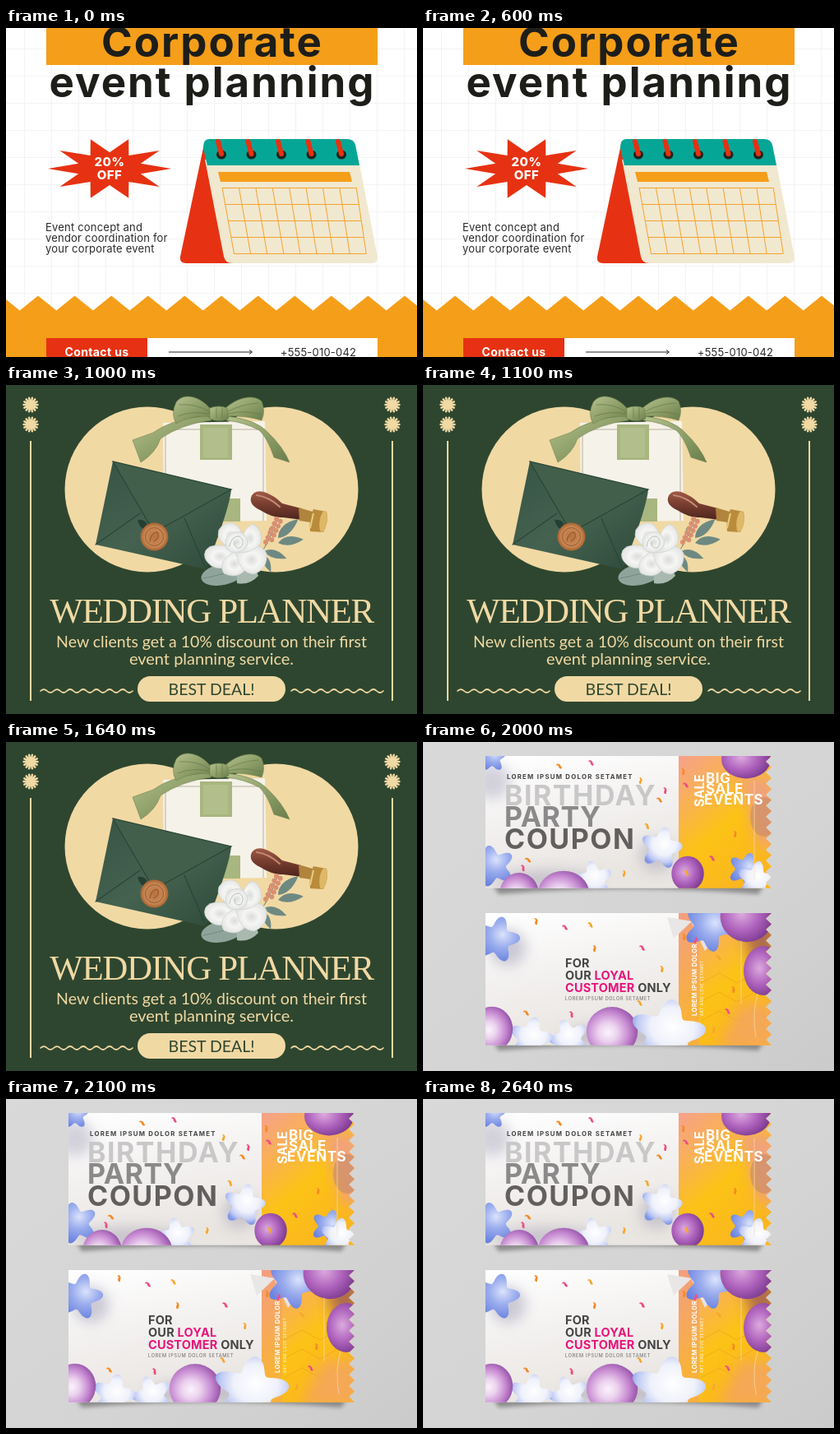
Animation, 500 px wide and 400 px high, one loop 3 s. Source, as an HTML page:

```html
<!DOCTYPE html>
<html lang="en">
<head>
<meta charset="utf-8">
<title>Event offers</title>
<style>
html, body { margin: 0; height: 100%; overflow: hidden; }
svg { display: block; width: 500px; height: 400px; font-family: Inter, sans-serif; }
.b { font-weight: 700; }
.mid { text-anchor: middle; }
.line { fill: none; stroke-linecap: round; }
</style>
</head>
<body>
<svg viewBox="0 0 500 400">
<defs>
  <pattern id="paper" x="22" y="25" width="33" height="33" patternUnits="userSpaceOnUse">
    <path d="M.5 0V33M0 .5H33" stroke="#f3f3f3" fill="none"/>
  </pattern>
  <linearGradient id="env" x2="1" y2="1"><stop stop-color="#365444"/><stop offset=".5" stop-color="#456250"/><stop offset="1" stop-color="#2c4939"/></linearGradient>
  <linearGradient id="silk" x2="1" y2="1"><stop stop-color="#b5c18f"/><stop offset=".5" stop-color="#8fa06a"/><stop offset="1" stop-color="#697d4b"/></linearGradient>
  <linearGradient id="wood" x2="0" y2="1"><stop stop-color="#a05c47"/><stop offset=".4" stop-color="#7c4032"/><stop offset="1" stop-color="#4d241d"/></linearGradient>
  <radialGradient id="petal"><stop stop-color="#d9dcd9"/><stop offset=".5" stop-color="#f6f6f4"/><stop offset="1" stop-color="#e4e6e5"/></radialGradient>
  <radialGradient id="seal"><stop stop-color="#b8713f"/><stop offset=".7" stop-color="#c98a57"/><stop offset="1" stop-color="#a7632f"/></radialGradient>
  <linearGradient id="wall" x2="1" y2="1"><stop stop-color="#d9d9d9"/><stop offset=".6" stop-color="#d4d4d4"/><stop offset="1" stop-color="#cbcbcb"/></linearGradient>
  <linearGradient id="sheet" x2=".25" y2="1"><stop stop-color="#fff"/><stop offset=".5" stop-color="#f3f1f0"/><stop offset="1" stop-color="#e9e5e1"/></linearGradient>
  <linearGradient id="gold" x2=".6" y2="1"><stop stop-color="#f6a08c"/><stop offset=".3" stop-color="#f9b155"/><stop offset=".6" stop-color="#fcc316"/><stop offset="1" stop-color="#fbb61f"/></linearGradient>
  <radialGradient id="ball" cx=".42" cy=".52" r=".62"><stop stop-color="#fbf3fb"/><stop offset=".3" stop-color="#ecd2ef"/><stop offset=".65" stop-color="#c78bd2"/><stop offset="1" stop-color="#8c479f"/></radialGradient>
  <radialGradient id="plum" cx=".4" cy=".45" r=".65"><stop stop-color="#dcaade"/><stop offset=".5" stop-color="#b064be"/><stop offset="1" stop-color="#743489"/></radialGradient>
  <radialGradient id="puff" cx=".55" cy=".42" r=".6"><stop stop-color="#fff"/><stop offset=".5" stop-color="#eff1fb"/><stop offset=".8" stop-color="#bfcaf3"/><stop offset="1" stop-color="#7f95e6"/></radialGradient>
  <radialGradient id="blue" cx=".6" cy=".4" r=".65"><stop stop-color="#dbe3fc"/><stop offset=".45" stop-color="#9dafee"/><stop offset="1" stop-color="#6b83df"/></radialGradient>
  <filter id="blur" x="-20%" y="-80%" width="140%" height="260%"><feGaussianBlur stdDeviation="2.500"/></filter>
  <filter id="haze" x="-60%" y="-60%" width="220%" height="220%"><feGaussianBlur stdDeviation="8"/></filter>
  <clipPath id="cut"><path id="edge"/></clipPath>
  <path id="star"/>
  <ellipse id="balloon" rx="24" ry="26"/>
  <path id="leaf" d="M0 0Q9-9 24 0 9 7 0 0Z"/>
  <path id="rosette" class="line" stroke="#f1d9a4" stroke-width="2.500"/>
</defs>

<g class="scene">
  <path d="M0 0H500V400H0Z" fill="#fff"/>
  <path d="M0 0H500V400H0Z" fill="url(#paper)"/>
  <path d="M49 0H452V45H49Z" fill="#f59e19"/>
  <g class="b mid" font-size="51" letter-spacing="2" fill="#1d1e1a">
    <text x="251" y="35">Corporate</text>
    <text x="251" y="84">event planning</text>
  </g>
  <path id="burst" fill="#e63212"/>
  <g class="mid" font-size="15" font-weight="800" letter-spacing=".5" fill="#fff">
    <text x="126" y="168">20%</text>
    <text x="126" y="184">OFF</text>
  </g>
  <g font-size="13" letter-spacing=".2" fill="#2b2b2b">
    <text x="48" y="247">Event concept and</text>
    <text x="48" y="260">vendor coordination for</text>
    <text x="48" y="273">your corporate event</text>
  </g>
  <path d="M241 141 212 278Q211 286 219 286H275L262 190Z" fill="#e63212"/>
  <path d="M242 160H429L452 279Q452 286 445 286H275Q267 286 265 278Z" fill="#f1e8d0"/>
  <path d="M247 135H415Q423 135 425 142L430 167H245L240 146Q240 135 247 135Z" fill="#06a697"/>
  <path d="M258 175H418L421 187H261Z" fill="#f59e19"/>
  <path id="days" fill="none" stroke="#f3a32c"/>
  <g id="rings"></g>
  <path id="zigzag" fill="#f59e19"/>
  <path d="M49 377H452V400H49Z" fill="#fff"/>
  <path d="M49 377H172V400H49Z" fill="#e63212"/>
  <text x="110.500" y="399" class="b mid" font-size="14" letter-spacing=".4" fill="#fff">Contact us</text>
  <path d="M198 394H299M296 391.500 299.500 394 296 396.500" fill="none" stroke="#222"/>
  <text x="380" y="399" class="mid" font-size="13" letter-spacing=".2" fill="#2b2b2b">+555-010-042</text>
</g>

<g class="scene">
  <path d="M0 0H500V400H0Z" fill="#2e462f"/>
  <g fill="#f1d9a4">
    <circle cx="172" cy="127" r="100.500"/><circle cx="328" cy="127" r="100.500"/>
    <path d="M172 60H328V195H172Z"/>
    <path d="M29 68h2V384h-2zM469 68h2V384h-2z"/>
    <rect x="160" y="354" width="180" height="31" rx="15.500"/>
  </g>
  <use href="#rosette" x="30" y="24"/><use href="#rosette" x="30" y="48"/>
  <use href="#rosette" x="470" y="24"/><use href="#rosette" x="470" y="48"/>

  <path d="M191 46 315 44 317 165 192 167Z" fill="#f5f2e9"/>
  <path d="M192 54H316M194 56V165M313 56V165" stroke="#d8d1c3" stroke-width="2"/>
  <path d="M236 48H275V91H236ZM263 138H285V166H263Z" fill="#a8b67f"/>
  <path d="M240 52H270V88H240Z" fill="#bac596" opacity=".6"/>
  <g fill="url(#silk)" stroke="#71834f" stroke-width=".6">
    <path d="M246 37Q202 41 179 58L154 67 164 94Q182 83 188 65 215 47 250 43Z"/>
    <path d="M270 38Q304 42 318 57 337 75 345 94L326 88Q318 64 308 55 289 45 268 43Z"/>
    <path d="M250 31C238 14 216 8 207 21Q200 35 207 47 225 36 250 39Z"/>
    <path d="M266 29C282 14 302 11 311 20Q316 32 311 43 292 37 266 38Z"/>
    <path d="M248 28Q259 24 269 28L271 41Q259 46 248 41Z"/>
  </g>
  <path d="M211 24Q231 22 248 33M209 38Q226 31 247 35M307 22Q288 23 270 32M310 36Q292 30 270 35M256 28V40M263 28V40" class="line" stroke="#647949" stroke-opacity=".7"/>

  <path d="M130 93 274 127Q272 150 243 224L109 194Z" fill="url(#env)"/>
  <path d="M130 93 177 174Q181 180 188 175L274 127Z" fill="#425f4b" stroke="#294534" stroke-width="1.200"/>
  <path d="M109 194 163 156M243 223 217 162" class="line" stroke="#294534" stroke-width="1.200"/>
  <path d="M160 164Q172 162 173 176 163 177 160 164Z" fill="#243f34"/>
  <circle cx="180.500" cy="184.500" r="17" fill="url(#seal)"/>
  <circle cx="180.500" cy="184.500" r="11" fill="none" stroke="#96562d"/>
  <path d="M175 190Q176 180 184 179 188 186 180 190" class="line" stroke="#8b4d28"/>

  <path d="M298 137Q301 127 314 130 326 134 336 144L359 150 361 164 337 161Q325 162 309 152 296 146 298 137Z" fill="url(#wood)"/>
  <path d="M305 134Q320 136 333 148" class="line" stroke="#c28a73" stroke-width="2"/>
  <path d="M356 149 373 154 371 167 357 165Z" fill="#b0843c"/>
  <path d="M374 151 390 154Q393 167 386 179L370 178Q368 162 374 151Z" fill="#b98b3b"/>
  <ellipse cx="386" cy="166" rx="4.500" ry="13" fill="#deb867" transform="rotate(8 386 166)"/>
  <path d="M374 156 370 174" stroke="#e9cb82" stroke-width="2"/>

  <g fill="#6e8982">
    <use href="#leaf" transform="translate(331 186) rotate(-43) scale(1.400)"/>
    <use href="#leaf" transform="translate(331 192) rotate(-8) scale(1.300)"/>
    <use href="#leaf" transform="translate(314 202) rotate(18) scale(1.200)"/>
    <use href="#leaf" transform="translate(312 206) rotate(65) scale(1)"/>
  </g>
  <path d="M302 215Q319 196 331 162M316 195 321 174" class="line" stroke="#758365"/>
  <g id="berries" fill="#d98f72"></g>
  <ellipse cx="264" cy="230" rx="27" ry="13" fill="#8fa59c" transform="rotate(-12 264 230)"/>
  <path d="M240 235Q262 231 288 222" class="line" stroke="#708b80"/>
  <path d="M280 220Q300 213 307 232 296 244 281 241Z" fill="#a9b9b0"/>
  <g fill="url(#petal)" stroke="#cdd1cf" stroke-width=".7">
    <path d="M277 198Q251 190 243 201 238 211 250 220 267 229 280 208Z"/>
    <path d="M277 203Q256 215 265 229 279 236 289 227 298 218 289 203Z"/>
    <path d="M285 198Q311 190 317 205 319 223 302 230 284 229 280 205Z"/>
    <path d="M284 198Q289 171 301 169 313 177 310 192 302 204 283 204Z"/>
    <path d="M275 199Q254 190 259 176 265 166 277 168 290 174 289 199Z"/>
    <path d="M267 188Q273 176 286 179 298 187 292 198 279 209 268 199Z"/>
  </g>
  <path d="M272 196Q274 183 284 184 292 190 285 198 277 199 278 191" class="line" stroke="#b9bfba"/>

  <g class="mid" fill="#f1d9a4">
    <text x="250" y="289" font-family="Liberation Serif, serif" font-size="43" letter-spacing="-1.400">WEDDING PLANNER</text>
    <g font-family="Lato, sans-serif" font-size="20">
      <text x="250" y="319" font-size="19.500">New clients get a 10% discount on their first</text>
      <text x="250" y="340">event planning service.</text>
      <text x="250" y="377" font-size="19.500" fill="#2e462f">BEST DEAL!</text>
    </g>
  </g>
  <path id="waves" class="line" stroke="#f1d9a4" stroke-width="1.700"/>
</g>

<g class="scene">
  <path d="M0 0H500V400H0Z" fill="url(#wall)"/>
  <g fill="#666" filter="url(#blur)" opacity=".65">
    <path d="M84 172H416L408 185Q250 172 92 185Z"/>
    <path d="M84 362H416L408 375Q250 362 92 375Z"/>
  </g>

  <g transform="translate(0 17)"><g clip-path="url(#cut)">
    <path d="M76 0H311V161H76Z" fill="url(#sheet)"/>
    <path d="M311 0H424V161H311Z" fill="url(#gold)"/>
    <g filter="url(#haze)">
      <g fill="#777394" opacity=".3">
        <circle cx="84" cy="30" r="22"/><ellipse cx="150" cy="152" rx="65" ry="13"/><circle cx="284" cy="120" r="20"/>
      </g>
      <path d="M385 25H430V110H410Z" fill="#ef9a92" opacity=".8"/>
    </g>
    <g fill="url(#blue)">
      <use href="#star" transform="translate(84 2) scale(.75)"/>
      <use href="#star" transform="translate(86 134) rotate(-15) scale(1.100)"/>
      <use href="#star" transform="translate(392 138) rotate(20) scale(.9)"/>
    </g>
    <g fill="url(#puff)">
      <use href="#star" transform="translate(290 112) rotate(12) scale(1.100)"/>
      <use href="#star" transform="translate(208 151) rotate(-10)"/>
      <use href="#star" transform="translate(405 151) rotate(10)"/>
    </g>
    <g fill="url(#ball)">
      <use href="#balloon" transform="translate(117 168) scale(1)"/>
      <use href="#balloon" transform="translate(171 167) scale(1.300 1.050)"/>
    </g>
    <g fill="url(#plum)">
      <use href="#balloon" transform="translate(322 143) scale(.82)"/>
      <use href="#balloon" transform="translate(393 4) scale(1.250 .9)"/>
    </g>
    <ellipse cx="415" cy="74" rx="17" ry="24" fill="#c58a6a" opacity=".6"/>
    <path d="M322 162V169M403 30V150" class="line" stroke="#f5dcb4" stroke-width=".7"/>
    <g class="bits"></g>
  </g></g>
  <g class="b">
    <text x="102" y="45" font-size="7.800" letter-spacing="1.250" fill="#444">LOREM IPSUM DOLOR SETAMET</text>
    <g font-size="34" letter-spacing="1.500">
      <text x="99" y="77" fill="#c9c8c8">BIRTHDAY</text>
      <text x="99" y="103" letter-spacing=".5" fill="#8b8989">PARTY</text>
      <text x="99" y="130" fill="#625f5f">COUPON</text>
    </g>
    <g font-size="17" letter-spacing=".6" fill="#fff">
      <text x="344" y="50">BIG</text>
      <text x="344" y="63">SALE</text>
      <text x="342" y="76">EVENTS</text>
      <text transform="translate(342 79) rotate(-90)" font-size="15.500" letter-spacing="0">SALE</text>
    </g>
  </g>

  <g transform="translate(0 208)"><g clip-path="url(#cut)">
    <path d="M76 0H311V161H76Z" fill="url(#sheet)"/>
    <path d="M311 0H424V161H311Z" fill="url(#gold)"/>
    <path d="M311 0H336V161H311Z" fill="#f09a72" opacity=".4"/>
    <path d="M338 85 360 73 382 85 404 73 424 85M338 108 360 96 382 108 404 96 424 108M338 131 360 119 382 131 404 119 424 131" fill="none" stroke="#eda41c" opacity=".7"/>
    <g filter="url(#haze)">
      <g fill="#777394" opacity=".35">
        <circle cx="103" cy="42" r="22"/><ellipse cx="238" cy="150" rx="65" ry="13"/>
      </g>
      <path d="M385 110H430V165H360Z" fill="#f3a36d" opacity=".7"/>
      <path d="M385 0H430V60H400Z" fill="#8f4a5e" opacity=".7"/>
    </g>
    <path d="M297 5 327 10 305 31Z" fill="#e9e6e6"/>
    <path d="M325 8 365 18 343 46Z" fill="#e7e2e5"/>
    <g fill="url(#blue)">
      <use href="#star" transform="translate(90 32) rotate(14) scale(1.200)"/>
      <use href="#star" transform="translate(347 17) rotate(22) scale(1.300)"/>
    </g>
    <g fill="url(#puff)">
      <use href="#star" transform="translate(178 153) rotate(-20) scale(1.050)"/>
      <use href="#star" transform="translate(131 153) rotate(12) scale(1.150)"/>
    </g>
    <g fill="url(#ball)">
      <use href="#balloon" transform="translate(84 141) scale(1.050)"/>
      <use href="#balloon" transform="translate(230 144) scale(1.300 1.150)"/>
    </g>
    <use href="#star" transform="translate(298 147) rotate(8) scale(2 1.800)" fill="url(#puff)"/>
    <g fill="url(#plum)">
      <use href="#balloon" transform="translate(394 4) scale(1.350 1.200)"/>
      <use href="#balloon" transform="translate(414 70) scale(1 1.150)"/>
    </g>
    <path d="M387 34V110M407 99Q400 121 405 151" class="line" stroke="#f5dcb4" stroke-width=".7"/>
    <g class="bits"></g>
  </g></g>
  <g class="b" font-size="14.500" letter-spacing=".2" fill="#454545">
    <text x="173" y="274">FOR</text>
    <text x="173" y="289">OUR <tspan fill="#e7157b">LOYAL</tspan></text>
    <text x="173" y="304"><tspan fill="#e7157b">CUSTOMER</tspan> ONLY</text>
  </g>
  <text x="173" y="314" font-size="5.500" letter-spacing=".75" fill="#666">LOREM IPSUM DOLOR SETAMET</text>
  <g fill="#fff">
    <text transform="translate(333 333) rotate(-90)" class="b" font-size="7.600" letter-spacing=".4">LOREM IPSUM DOLOR</text>
    <text transform="translate(341 333) rotate(-90)" font-size="4.400" letter-spacing=".7">ART AND LOVE SETAMET</text>
  </g>
</g>
</svg>
<script>
const $ = id => document.getElementById(id);
const range = n => [...Array(n).keys()];
const path = (id, d) => $(id).setAttribute('d', d);
const polar = (r, a) => [r * Math.cos(a), r * Math.sin(a)];

path('burst', 'M' + range(20).map(i => {
  const [x, y] = polar(i % 2 ? .53 : 1, i * Math.PI / 10);
  return [126 + 75 * x, 171 + 37.5 * y];
}).join('L') + 'Z');

path('days',
  range(9).map(i => `M${263 + i * 20.4} 194L${277.5 + i * 20.1} 274.5`).join('') +
  range(5).map(i => `M${263 + i * 3.6} ${194.5 + i * 20}H${426 + i * 3}`).join(''));

$('rings').innerHTML = range(5).map(i => `<g transform="translate(${262 + i * 36.5} 154)">
  <ellipse rx="6" ry="5.500" fill="#20251f"/>
  <path d="M-4-16 0-1" class="line" stroke="#e63212" stroke-width="6"/></g>`).join('');

path('zigzag', 'M-5.6 325.5' + 'l22.3 18 22.3-18'.repeat(12) + 'V400H-6Z');

path('rosette', range(14).map(i => 'M0 0L' + polar(8.5, i * Math.PI / 7)).join(''));

path('waves', [42, 347].map(x => `M${x} 372` + 'q4-4 8 0t8 0'.repeat(7)).join(''));

$('berries').innerHTML = range(11).map(i =>
  `<circle cx="${318 + i * 1.3 + (i % 2 ? 4 : -2)}" cy="${191 - i * 2.8}" r="3"/>`).join('');

// Puffy star: a circle swelling five times around
path('star', 'M' + range(80).map(i => {
  const a = i * Math.PI / 40;
  return polar(18.5 + 5 * Math.cos(5 * a), a - Math.PI / 2);
}).join('L') + 'Z');

path('edge', 'M76 0H424' + 'l-7 6.7 7 6.7'.repeat(12) + 'H76Z');

// Confetti: x, y, turn
const confetti = [
  [[166, 12, 20], [205, 8, 30], [265, 30, 70], [288, 53, 20], [295, 42, 60], [273, 85, 40],
   [128, 126, 15], [122, 136, 50], [245, 143, 70], [317, 19, 60], [320, 35, 20], [372, 25, 30],
   [380, 95, 65], [352, 124, 25], [321, 142, 40]],
  [[138, 10, 60], [173, 17, 20], [204, 14, 30], [209, 43, 65], [267, 42, 25], [291, 68, 60],
   [126, 121, 20], [181, 123, 50], [264, 109, 30], [318, 29, 60], [332, 33, 80], [360, 54, 20],
   [378, 93, 60], [371, 119, 30], [354, 142, 70]]
];
const tints = ['#f58a24', '#ef4c86', '#f7a62c'];
document.querySelectorAll('.bits').forEach((g, n) => {
  g.innerHTML = confetti[n].map(([x, y, turn], i) =>
    `<path d="M-4-1Q-1-3 1-1T4 1L3 3Q0 3-1 1T-4 1Z" fill="${tints[i % 3]}" transform="translate(${x} ${y}) rotate(${turn})"/>`).join('');
});

const scenes = document.querySelectorAll('.scene');
function draw() {
  const now = Math.floor(performance.now() % 3000 / 1000);
  scenes.forEach((s, i) => s.style.display = i === now ? '' : 'none');
  requestAnimationFrame(draw);
}
draw();
</script>
</body>
</html>
```
